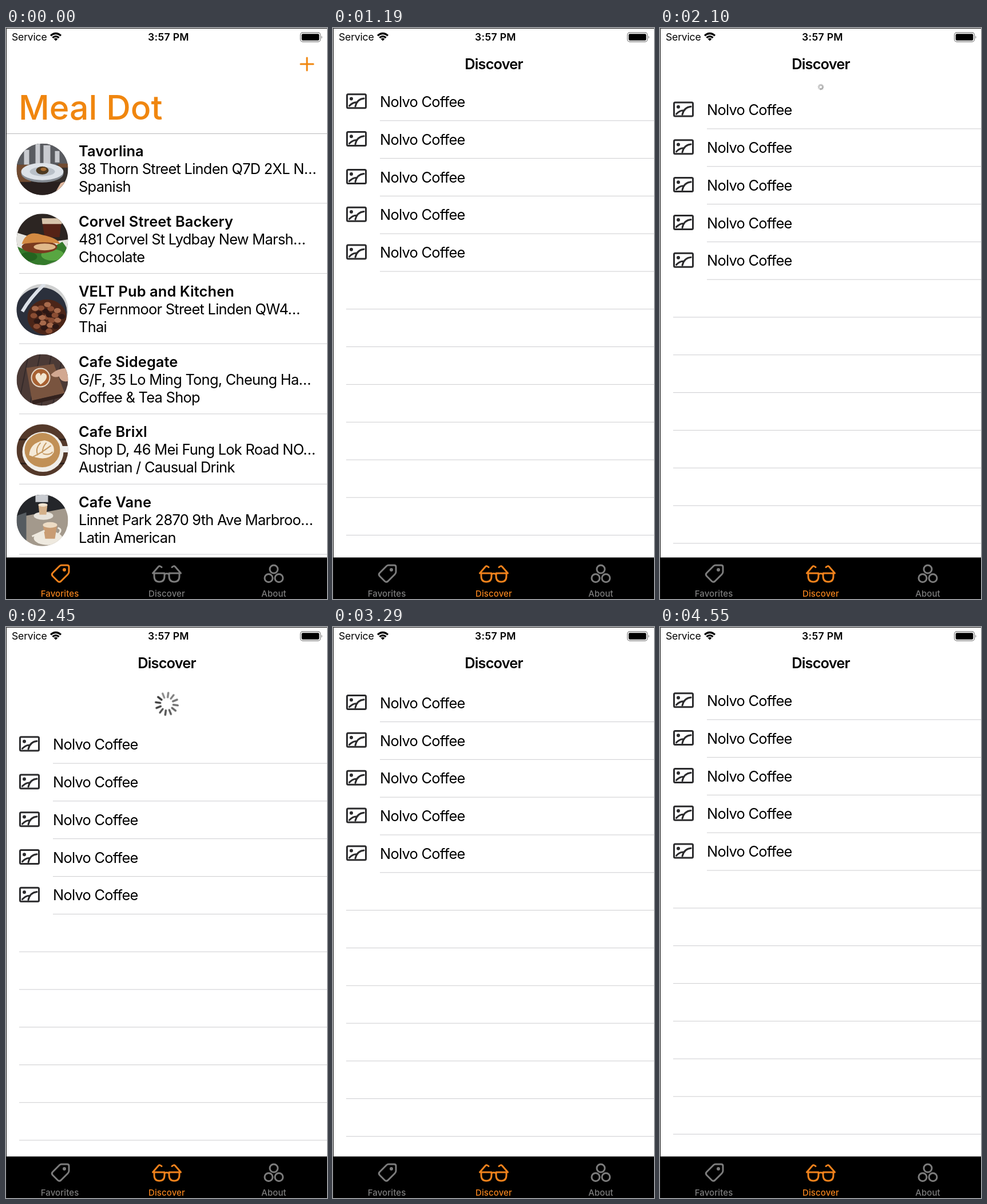
These frames come from a looping animation (561x997 px, 4.69 s). An HTML page:

```html
<!DOCTYPE html>
<html lang="en">
<head>
<meta charset="utf-8">
<title>Restaurant app</title>
<style>
@property --y { syntax: '<number>'; inherits: true; initial-value: 0; }
@property --s { syntax: '<number>'; inherits: true; initial-value: 0; }
html, body { margin: 0; width: 100%; height: 100%; overflow: hidden; background: #fff; }
svg {
  display: block; width: 100vw; height: 100vh;
  font: 400 25.4px Inter, Roboto, sans-serif; letter-spacing: -.72px;
  animation: pull 4690ms linear infinite, grow 4690ms linear infinite;
}
.bold { font-weight: 600; letter-spacing: -.85px; }
.name { font-weight: 600; letter-spacing: .1px; }
.mid { text-anchor: middle; }
.title { font-size: 59px; font-weight: 500; letter-spacing: 0; }
.status { font-size: 17.6px; letter-spacing: -.2px; }
.clock { font-weight: 600; letter-spacing: .3px; }
.tab { font-size: 15px; font-weight: 500; letter-spacing: .1px; }
.rule { stroke: #cdcdd0; stroke-width: 1; }
.line { fill: none; stroke-linecap: round; stroke-linejoin: round; }
#discover { animation: open 4690ms step-end infinite; }
#rows { animation: load 4690ms step-end infinite; }
#list { transform: translateY(calc(var(--y) * 1px)); }
#spinner { transform: translate(281px, calc(96px + var(--y) * .5px)) scale(var(--s)); }
#wheel { animation: spin 4690ms steps(56) infinite; }
#ring { transform: rotate(8deg); animation: settle 4690ms linear infinite; }

@keyframes open { 0% { opacity: 0 } 7.46%, 100% { opacity: 1 } }
@keyframes load {
  0% { opacity: 0 } 17.06% { opacity: 1 }
  58.2% { opacity: 0 } 64.17% { opacity: 1 }
  77.6% { opacity: 0 } 82.08%, 100% { opacity: 1 }
}
@keyframes pull {
  0%, 40.3% { --y: 0; }
  44.776% { --y: 14; }
  52% { --y: 74; }
  59.7%, 64.18% { --y: 142; }
  67.16% { --y: 51; }
  70.15% { --y: 3.8; }
  72%, 73.13% { --y: 0; }
  79.1%, 82.09% { --y: 142; }
  85.075% { --y: 51; }
  88.06% { --y: 3.8; }
  91%, 100% { --y: 0; }
}
@keyframes grow {
  0%, 41.5% { --s: 0; }
  44.776% { --s: .24; }
  52%, 64.18% { --s: 1; }
  67.16% { --s: .87; }
  69.5%, 74% { --s: 0; }
  77%, 82.09% { --s: 1; }
  85.075% { --s: .87; }
  87.5%, 100% { --s: 0; }
}
@keyframes spin { from { transform: rotate(-202deg) } to { transform: rotate(1478deg) } }
@keyframes settle {
  0%, 59.7% { opacity: .3 } 64.18% { opacity: 0 }
  73%, 79.1% { opacity: .3 } 82.09%, 100% { opacity: 0 }
}
</style>
</head>
<body>
<svg viewBox="0 0 561 997" preserveAspectRatio="none" xmlns="http://www.w3.org/2000/svg">
  <defs><clipPath id="disc"><circle r="45"/></clipPath></defs>
  <rect width="561" height="997" fill="#fff"/>
  <g id="favorites"></g>
  <g id="discover"></g>
  <g id="statusbar">
    <text class="status" x="10" y="22.3">Service</text>
    <path d="M78 13.4Q87 5.6 96 13.4M81.4 17Q87 12.2 92.6 17" fill="none" stroke="#000" stroke-width="3.2"/>
    <path d="M83.6 19Q87 16.4 90.4 19L87 22.6Z"/>
    <text class="status clock mid" x="284" y="22.3">3:57 PM</text>
    <rect x="514.5" y="8" width="35" height="16" rx="4" fill="none" stroke="#8a8a8a" stroke-width="1.3"/>
    <rect x="516.7" y="10.2" width="30.6" height="11.6" rx="2"/>
    <path d="M551.3 13.2q2.4 2.8 0 5.6z" fill="#777"/>
  </g>
  <path d="M.5 997V.5H561" fill="none" stroke="#111"/>
</svg>
<script>
const ORANGE = '#f0860f', ACTIVE = '#f0821c', GRAY = '#7c7c7c', PITCH = 65.8, TOP = 96;
const put = (id, html) => document.getElementById(id).innerHTML = html;
const repeat = (n, f) => Array.from({ length: n }, (_, i) => f(i)).join('');
const text = (x, y, s, cls = '') => `<text x="${x}" y="${y}" class="${cls}">${s}</text>`;
const rule = (x, y) => `<path class="rule" d="M${x} ${y}H561"/>`;
const oval = (x, y, rx, ry, fill) => `<ellipse cx="${x}" cy="${y}" rx="${rx}" ry="${ry}" fill="${fill}"/>`;
const shape = (d, fill) => `<path d="${d}" fill="${fill}"/>`;
const box = fill => shape('M-45-45h90v90h-90z', fill);

const lens = 'M259 952H277V957Q277 967 268 967Q259 967 259 957ZM256.5 952L266 941Q268.5 938 272 941.5';
const tabs = [
  ['Favorites', 94, c => `<path d="M97 938H107Q110 938 110 941V949.5Q110 952 108 954L96 966Q93 968.5 90.5 966L81.5 957Q79 954 81.5 951.5L93.5 939.5Q95 938 97 938Z"/><circle cx="102" cy="946" r="1.5" fill="${c}"/>`],
  ['Discover', 281, () => `<path d="${lens}M277 954Q281 951 285 954"/><path d="${lens}" transform="matrix(-1 0 0 1 562 0)"/>`],
  ['About', 468, () => '<circle cx="468" cy="945" r="7"/><circle cx="459" cy="960.5" r="7"/><circle cx="477" cy="960.5" r="7"/>']
];
const tabBar = active => '<path d="M0 924.5H561V997H0Z"/>' + tabs.map(([name, x, icon], i) => {
  const c = i === active ? ACTIVE : GRAY;
  return `<g class="line" stroke="${c}" stroke-width="3">${icon(c)}</g><g fill="${c}">${text(x, 992.5, name, 'tab mid')}</g>`;
}).join('');

const photos = [
  box('#35302d') + shape('M-45-45H45V-8H-45Z', '#595b60') + shape('M-32-34h9v26h-9zM-12-45h8v36h-8zM2-42h12v32H2zM22-32h8v20h-8z', '#c9cbd0')
    + shape('M-45-8H-20V45H-45ZM28-10H45V-3H28Z', '#714b31') + shape('M-45 22H45V45H-45Z', '#281f1e') + oval(0, 7, 37, 16, '#858b93') + oval(0, 4, 37, 15, '#dde2e8')
    + oval(0, 4, 22, 8, '#b9c0c8') + oval(0, 2, 11, 7, '#4c3921') + oval(2, 0, 5, 3, '#a46b33') + shape('M20 45L32 24Q42 19 45 24V45Z', '#e0b9a0'),
  box('#2c2522') + shape('M-45-12L10 5L45 0V45H-45Z', '#e5e4df') + shape('M-1-36H34L30-4H4Z', '#552216') + shape('M-1-37H35L34-27H0Z', '#d8c4ab')
    + shape('M-45 12L-25 20L10 18L35 4L45 18L30 36L5 45L-32 42Z', '#347a2b') + oval(18, 27, 20, 10, '#58a641') + oval(-24, 30, 15, 8, '#24631f')
    + oval(-5, 13, 31, 11, '#7a3b1f') + oval(4, 13, 19, 6, '#e0b98b') + shape('M-36 8Q-28-18 0-8Q28-2 31 8Q5 2-36 8Z', '#d38a42'),
  box('#cfd0d0') + oval(-2, 4, 45, 43, '#2b303c') + oval(8, 13, 34, 31, '#4b2518')
    + repeat(22, i => oval(8 + 28 * Math.sin(i * 2.4) * Math.sqrt(i / 22), 13 + 25 * Math.cos(i * 2.4) * Math.sqrt(i / 22), 6, 4.5, ['#8a4d33', '#2d1714', '#a76a4c'][i % 3]))
    + '<path d="M-35 3Q-22-20 4-45" fill="none" stroke="#dce1e8" stroke-width="6"/>',
  box('#4b3a36') + repeat(5, i => shape(`M${-45 + i * 20}-45h2l-18 90h-2z`, '#342a2a')) + shape('M-28-21L20-28L39 23L-18 36Z', '#79543f')
    + shape('M-18 36L39 23V29L-17 43Z', '#33221e') + oval(-3, -4, 17, 17, '#e4d7c8') + oval(-3, -4, 15, 15, '#a86132') + shape('M-3 8Q-18-6-8-12Q-3-13-3-7Q1-16 7-9Q10-1-3 8Z', '#f2e4ce')
    + shape('M45-21Q24-20 15-9Q20-3 29-6Q33 5 45 2Z', '#d2a891'),
  box('#54392a') + shape('M-45-20H45V-17H-45ZM-45 22H45V25H-45Z', '#2f211b') + shape('M30-7H45V4H30Z', '#eee') + oval(1, 3, 36, 35, '#f0eee9') + oval(0, 0, 31, 30, '#c19056')
    + shape('M-23 9Q-22-13 4-17Q23-13 20 4Q10 22-23 9Z', '#f5ead8') + '<path d="M-17 12Q-2 5 15-8M-8 9Q-13-3-3-13M0 5Q0-5 7-13M1 6Q12 10 18 3" fill="none" stroke="#c69a63" stroke-width="2"/>',
  box('#a3998c') + shape('M-45-45H45V-22L-45-5Z', '#24262a') + shape('M-12-45H10V-32H-12Z', '#c8cbd0') + shape('M-45-8L-28-14V45H-45Z', '#555b60')
    + oval(2, -8, 17, 7, '#e7e3db') + shape('M-7-28H9L7-10H-5Z', '#d4b18b') + oval(1, -27, 8, 3, '#f2e5d2') + oval(10, 31, 25, 12, '#eee9df')
    + shape('M1 7H26L22 32H5Z', '#c99c73') + oval(13.5, 8, 12.5, 5, '#eddcc5') + '<path d="M27 13q9 3 1 11M-18 28L4 18" fill="none" stroke="#eee9df" stroke-width="3"/>'
];

const places = [
  ['Tavorlina', '38 Thorn Street Linden Q7D 2XL N…', 'Spanish'],
  ['Corvel Street Backery', '481 Corvel St Lydbay New Marsh…', 'Chocolate'],
  ['VELT Pub and Kitchen', '67 Fernmoor Street Linden QW4…', 'Thai'],
  ['Cafe Sidegate', 'G/F, 35 Lo Ming Tong, Cheung Ha…', 'Coffee &amp; Tea Shop'],
  ['Cafe Brixl', 'Shop D, 46 Mei Fung Lok Road NO…', 'Austrian / Causual Drink'],
  ['Cafe Vane', 'Linnet Park 2870 9th Ave Marbroo…', 'Latin American']
];
put('favorites', `<g fill="${ORANGE}">${text(22, 160, 'Meal Dot', 'title')}</g>`
  + `<path class="line" stroke="${ORANGE}" stroke-width="3" d="M515 63H537M526 52V74"/>`
  + '<path d="M0 184.5H561" stroke="#b9b9bb"/>'
  + places.map(([name, street, kind], i) => {
    const y = 122.6 * i;
    return `<g transform="translate(63.5 ${246.7 + y})" clip-path="url(#disc)">${photos[i]}</g>`
      + text(127, 224 + y, name, 'name') + text(127, 255 + y, street) + text(127, 286 + y, kind) + rule(23, 306 + y);
  }).join('') + tabBar(0));

const picture = `<g class="line" stroke="#2b2b2d" stroke-width="3">
  <rect x="24.5" y="19.8" width="33" height="24" rx="2"/>
  <path d="M28.5 40Q35 33 42 34M39 41Q42 28 54 27"/>
  <circle cx="32" cy="27.5" r="1.5" fill="#2b2b2d"/></g>`;
const row = i => `<g transform="translate(0 ${TOP + PITCH * i})"><path d="M0 0H82V67H0Z" fill="#fff"/>${picture}${text(82, 42, 'Nolvo Coffee')}</g>`;
const ticks = alpha => repeat(12, i =>
  `<path class="line" d="M0-11.5V-19.5" stroke="#000" stroke-width="3.2" opacity="${alpha(i)}" transform="rotate(${-30 * i})"/>`);

put('discover', '<path d="M0 0H561V997H0Z" fill="#fff"/>'
  + `<g id="list">${repeat(12, i => rule(23, TOP + PITCH * (i + 1)))}<g id="rows">${repeat(5, row)}</g></g>`
  + `<g id="spinner"><g id="ring">${ticks(() => 1)}</g><g id="wheel">${ticks(i => .72 - .045 * i)}</g></g>`
  + text(281, 72.3, 'Discover', 'bold mid') + tabBar(1));
</script>
</body>
</html>
```
